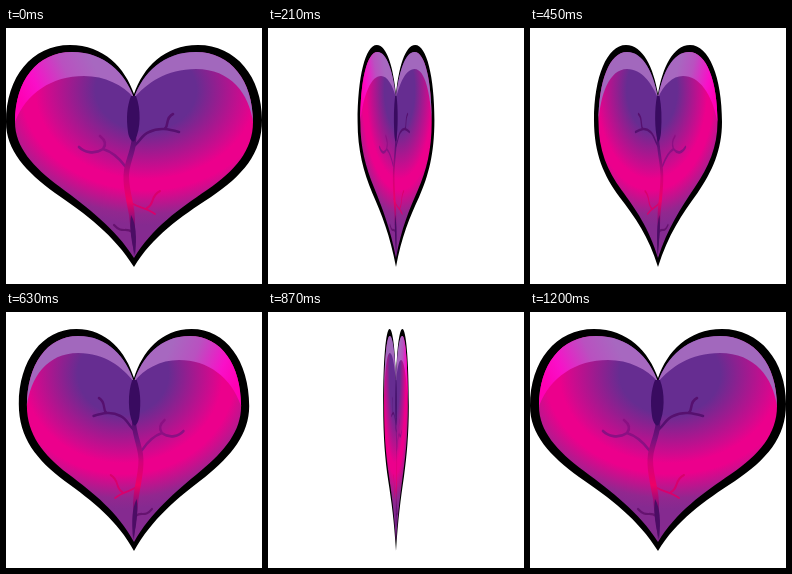
These frames come from a looping animation (256x256 px, 1230 ms). An HTML page with a canvas:

```html
<!DOCTYPE html>
<html lang="en">
<head>
<meta charset="utf-8">
<title>Turning heart</title>
<style>
  html, body { margin: 0; width: 100%; height: 100%; overflow: hidden; background: #fff; }
  canvas { display: block; width: 256px; height: 256px; }
</style>
</head>
<body>
<canvas id="stage" width="256" height="256"></canvas>
<script>
const ctx = document.getElementById('stage').getContext('2d');
const STEP = 30, STEPS = 41, HALF_TURN = 20;

const outer = new Path2D(`M128 66 C119 40 98 17 64 17 C26 17 0 49 0 94
  C0 122 20 144 49 165 C80 186 108 207 128 239
  C146 209 174 189 205 169 C236 148 256 126 256 92
  C256 49 230 17 192 17 C158 17 137 40 128 66 Z`);
const inner = new Path2D(`M128 70 C119 45 99 24 66 24 C31 24 9 53 9 94
  C9 119 27 139 54 159 C82 180 109 200 128 230
  C146 200 173 181 201 162 C229 143 247 122 247 94
  C247 53 225 24 190 24 C157 24 137 45 128 70 Z`);
const glossLeft = new Path2D(`M128 70 C119 45 99 24 66 24 C31 24 9 53 9 94
  C20 65 46 48 78 48 C99 48 117 57 128 70 Z`);
const glossRight = new Path2D(`M128 70 C137 45 157 24 190 24 C225 24 247 53 247 94
  C243 66 225 41 190 41 C160 41 141 55 128 70 Z`);
const trunk = new Path2D(`M126 106 L130 106 C132 121 124 132 123 147
  C123 165 130 178 129 198 L128 228 C127 214 124 201 123 187
  C120 170 116 155 118 142 C120 130 126 119 126 106 Z`);
const knot = new Path2D(`M125 68 L130 68 C135 80 135 101 129 112
  C127 116 123 111 122 104 C120 90 121 78 125 68 Z`);
const wedge = new Path2D('M125 187 C130 196 131 208 129 228 C126 216 123 200 125 187 Z');
const upperTwigs = new Path2D(`M126 119 C133 116 135 107 143 104 C153 99 163 101 173 104
  M159 101 C163 97 159 90 167 86`);
const leftTwigs = new Path2D(`M119 138 C113 130 107 124 97 121 C88 127 78 124 73 119
  M97 121 C101 116 99 112 94 108`);
const redTwigs = new Path2D(`M121 171 C128 180 138 178 149 186
  M141 180 C149 176 144 168 154 163`);
const lowTwig = new Path2D('M126 204 C120 199 116 206 108 197');

function gradient(g, stops) {
  for (const [at, color] of stops) g.addColorStop(at, color);
  return g;
}

const body = gradient(ctx.createRadialGradient(0, 0, 0, 0, 0, 1.5), [
  [0, '#662d91'], [0.3, '#662d91'], [0.59, '#d00a8e'], [0.66, '#ec008c'],
  [0.74, '#ec008c'], [0.92, '#92278f'], [1, '#852a90']
]);
const shine = gradient(ctx.createLinearGradient(14, 70, 88, 36), [
  [0, '#ff00b4'], [0.25, '#f910c8'], [0.65, '#b951c0'], [1, '#a768c0']
]);
const bark = gradient(ctx.createLinearGradient(0, 106, 0, 228), [
  [0, '#450e68'], [0.18, '#76127d'], [0.36, '#d3007a'], [0.55, '#ee0067'],
  [0.67, '#a00b78'], [0.8, '#55116c'], [1, '#5b146f']
]);

function fill(path, style) {
  ctx.fillStyle = style;
  ctx.fill(path);
}

function twig(path, color, width) {
  ctx.strokeStyle = color;
  ctx.lineWidth = width;
  ctx.stroke(path);
}

function drawHeart() {
  fill(outer, '#000');
  ctx.save();
  ctx.clip(inner);
  ctx.translate(140, 62);
  ctx.scale(112, 90);
  ctx.fillStyle = body;
  ctx.fillRect(-2, -2, 4, 4);
  ctx.restore();

  fill(glossLeft, shine);
  fill(glossRight, '#a268bd');

  ctx.lineCap = ctx.lineJoin = 'round';
  twig(upperTwigs, '#56106f', 2.6);
  twig(leftTwigs, '#8b1083', 2.6);
  twig(redTwigs, '#d9006c', 2);
  twig(lowTwig, '#65136f', 2.2);
  fill(trunk, bark);
  fill(wedge, '#4b0d64');
  fill(knot, '#390b60');
}

function draw() {
  const step = Math.floor(performance.now() / STEP) % STEPS;
  // The width runs linearly from 1 to -1 and back.
  const turn = Math.abs(step - HALF_TURN) / (HALF_TURN / 2) - 1;
  ctx.fillStyle = '#fff';
  ctx.fillRect(0, 0, 256, 256);
  if (turn !== 0) {
    ctx.save();
    ctx.translate(128, 0);
    ctx.scale(turn, 1);
    ctx.translate(-128, 0);
    drawHeart();
    ctx.restore();
  }
  requestAnimationFrame(draw);
}
draw();
</script>
</body>
</html>
```
